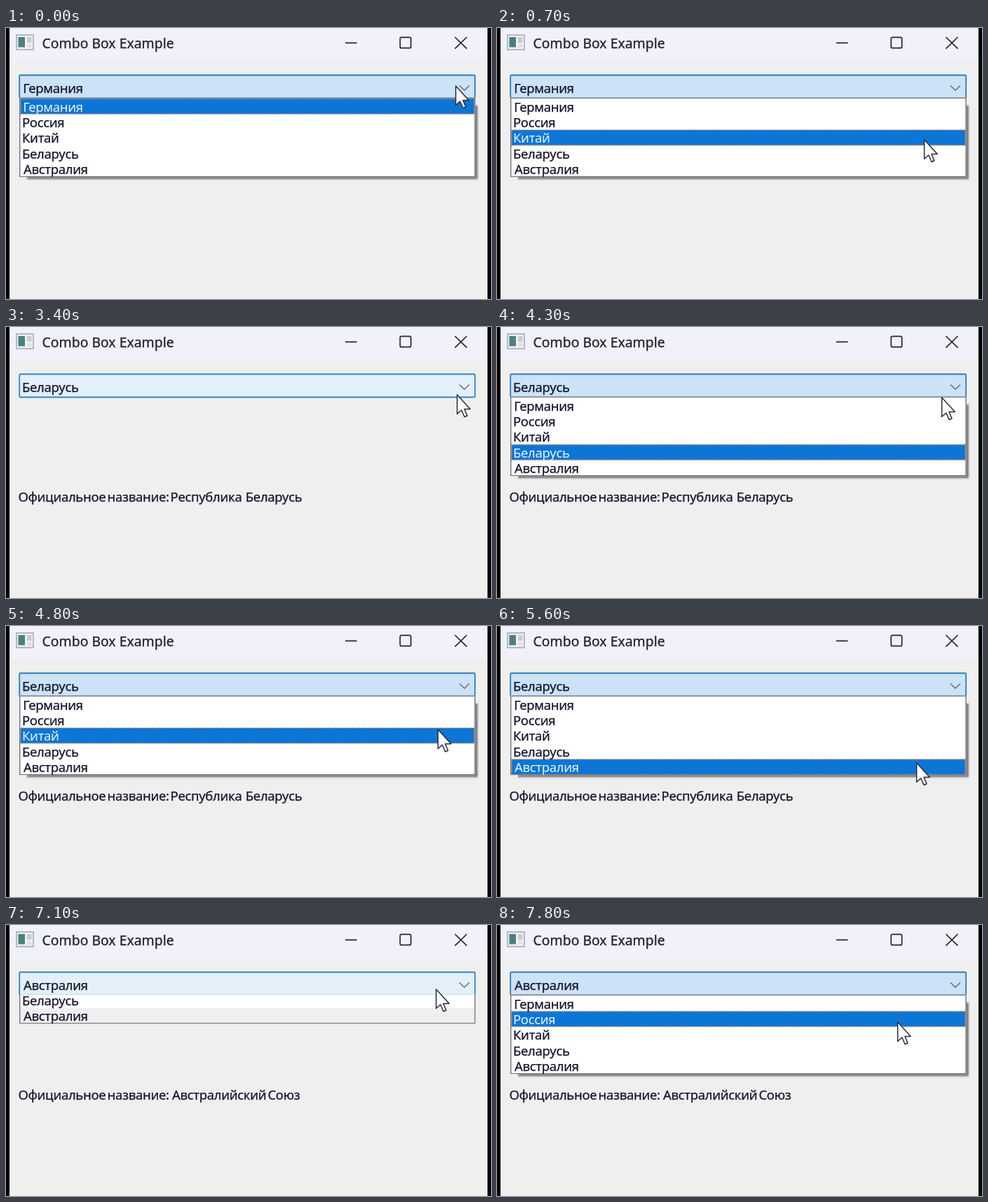
An HTML page for the animation above (8000 ms loop, 692 by 388 pixels).

```html
<!DOCTYPE html>
<html lang="ru">
<head>
<meta charset="utf-8">
<title>Combo Box Example</title>
<style>
  html, body { margin: 0; width: 100%; height: 100%; overflow: hidden; background: #000; }
  #stage { display: block; width: 692px; height: 388px; }
  text {
    font: 18.5px "Noto Sans", "Open Sans", sans-serif; letter-spacing: -.35px;
    fill: #14142f; stroke: #14142f; stroke-width: .25;
  }
  text.marked { fill: #eaf4fd; stroke: none; }
  #title { font-size: 19.4px; letter-spacing: 0; fill: #222228; }
  .line { fill: none; stroke: #26262a; stroke-width: 1.7; }
</style>
</head>
<body>
<svg id="stage" viewBox="0 0 692 388">
  <defs><filter id="soft"><feGaussianBlur stdDeviation="1.2"/></filter></defs>
  <rect width="692" height="388" fill="#000"/>
  <rect x="5" width="682" height="388" fill="#efefef"/>
  <rect x="5" width="682" height="48" fill="#f0f1fa"/>

  <g id="icon">
    <rect x="15" y="10" width="24" height="21" fill="#f0f1f2" stroke="#a4a7aa" stroke-width="1.5"/>
    <rect x="17.5" y="13" width="9.5" height="14.5" fill="#4a8084"/>
    <rect x="30" y="13" width="6.5" height="8" fill="#c9cdd0"/>
    <rect x="30" y="23" width="6.5" height="5" fill="#dfe1e3"/>
  </g>
  <text id="title" x="51.6" y="28.7">Combo Box Example</text>
  <path class="line" d="M484 21.3h16.6M640.5 13l17 16.6M657.5 13l-17 16.6"/>
  <rect class="line" x="562.3" y="13.3" width="15.4" height="15.4" rx="2"/>

  <rect id="combo" x="19.2" y="67.5" width="650" height="33" rx="1.5" stroke-width="1.8"/>
  <path d="M647 82.5l7 6.8 7-6.8" fill="none" stroke="#696d73" stroke-width="1.5"/>
  <text id="value" y="92.5"></text>
  <g id="label"></g>

  <rect id="shadow" x="30" y="111" width="643" height="105.5" fill="#7c7c7c" filter="url(#soft)"/>
  <svg id="popup" x="19" y="99.5" width="651" height="114">
    <g id="list">
      <rect width="651" height="114" fill="#fff"/>
      <rect id="mark" x="1.8" width="647.4" height="21.9" stroke-dasharray="1.7 1.7" stroke-width="1.7"/>
      <rect x=".7" y=".7" width="649.4" height="112.6" fill="none" stroke="#707378" stroke-width="1.4"/>
    </g>
  </svg>

  <path id="cursor" d="M.7 0V27.5L6.8 22 11.2 31.8 15 30 11 20.5H19.3Z"
        fill="#fff" stroke="#2b2b38" stroke-width="1.5" stroke-linejoin="round"/>
</svg>

<script>
const LOOP = 8000, STEP = 100, LIST_TOP = 101.5, ROW = 22.4, LIST_HEIGHT = 114;
const $ = id => document.getElementById(id);

const countries = [
  ['Германия', 24.2], ['Россия', 23], ['Китай', 23], ['Беларусь', 23], ['Австралия', 25]
];
const prefix = [['Официальное', 17.4], ['название:', 144.5]];
const labels = {
  3: [...prefix, ['Республика', 234.6], ['Беларусь', 341.8]],
  4: [...prefix, ['Австралийский', 237], ['Союз', 373.5]]
};

// time, x, y
const path = [
  [0, 641, 83], [300, 632, 108], [600, 612, 155], [900, 603, 170], [2300, 603, 170],
  [3200, 643, 97], [3700, 643, 97], [4300, 634, 101], [5200, 601, 186], [5600, 598, 196],
  [6200, 598, 196], [6900, 614, 90], [7100, 613, 92], [7500, 592, 100], [7700, 574, 117],
  [7800, 571, 139]
];

// fill and border of the combo box
const states = {
  pressed: [203, 226, 247, 44, 124, 184],
  fading: [211, 230, 246, 62, 136, 194],
  normal: [227, 227, 227, 173, 173, 173],
  hot: [227, 239, 249, 46, 134, 196]
};
const shades = [
  [0, 'pressed'], [1600, 'pressed'], [1700, 'fading'], [2200, 'normal'], [3100, 'normal'],
  [3300, 'hot'], [3700, 'hot'], [3900, 'pressed'], [5900, 'pressed'], [6000, 'fading'],
  [6500, 'normal'], [6800, 'normal'], [7000, 'hot'], [7100, 'hot'], [7300, 'pressed']
].map(([time, name]) => [time, ...states[name]]);

// open from, open until, selected row
const sessions = [[-1000, 1700, 0], [3700, 6000, 3], [7000, 8000, 4]];

function sample(table, time) {
  const next = table.findIndex(row => row[0] > time);
  if (next < 0) return table[table.length - 1].slice(1);
  const a = table[next - 1], b = table[next];
  const k = (time - a[0]) / (b[0] - a[0]);
  return a.slice(1).map((v, i) => v + (b[i + 1] - v) * k);
}

function addText(parent, [string, x], y) {
  const node = document.createElementNS('http://www.w3.org/2000/svg', 'text');
  node.setAttribute('x', x);
  node.setAttribute('y', y);
  node.textContent = string;
  parent.append(node);
  return node;
}

function set(id, attributes) {
  for (const name in attributes) $(id).setAttribute(name, attributes[name]);
}

const rows = countries.map(([name, x], i) => addText($('list'), [name, x - 19], 20 + i * ROW));
let shownValue = -1;

function showValue(index) {
  if (index === shownValue) return;
  shownValue = index;
  $('value').textContent = countries[index][0];
  set('value', { x: countries[index][1] });
  $('label').replaceChildren();
  (labels[index] || []).forEach(word => addText($('label'), word, 250.2));
}

function showPopup(session, time, cursorY) {
  const visible = session ? 'visible' : 'hidden';
  set('popup', { visibility: visible });
  if (!session) return set('shadow', { visibility: visible });

  const height = Math.min(LIST_HEIGHT, 0.42 * (time - session[0]));
  const settled = height === LIST_HEIGHT;
  const hovered = Math.floor((cursorY - LIST_TOP) / ROW);
  const current = settled && hovered >= 0 ? Math.min(hovered, 4) : session[2];
  set('shadow', { visibility: settled ? visible : 'hidden' });
  set('popup', { height: Math.max(height, 0.01) });
  set('list', { transform: `translate(0 ${height - LIST_HEIGHT})` });
  set('mark', {
    y: 1.7 + current * ROW,
    fill: settled ? '#0c76d6' : '#efefef',
    stroke: settled ? '#b98a5c' : 'none'
  });
  rows.forEach((row, i) => row.classList.toggle('marked', settled && i === current));
}

function render(now) {
  const time = Math.floor(now % LOOP / STEP) * STEP;
  const [x, y] = sample(path, time);
  const c = sample(shades, time).map(Math.round);
  set('cursor', { transform: `translate(${x} ${y})` });
  set('combo', { fill: `rgb(${c.slice(0, 3)})`, stroke: `rgb(${c.slice(3)})` });
  showValue(time < 1700 ? 0 : time < 6000 ? 3 : 4);
  showPopup(sessions.find(s => time >= s[0] && time < s[1]), time, y);
}

const start = performance.now();
function tick() {
  render(performance.now() - start);
  requestAnimationFrame(tick);
}
tick();
</script>
</body>
</html>
```
